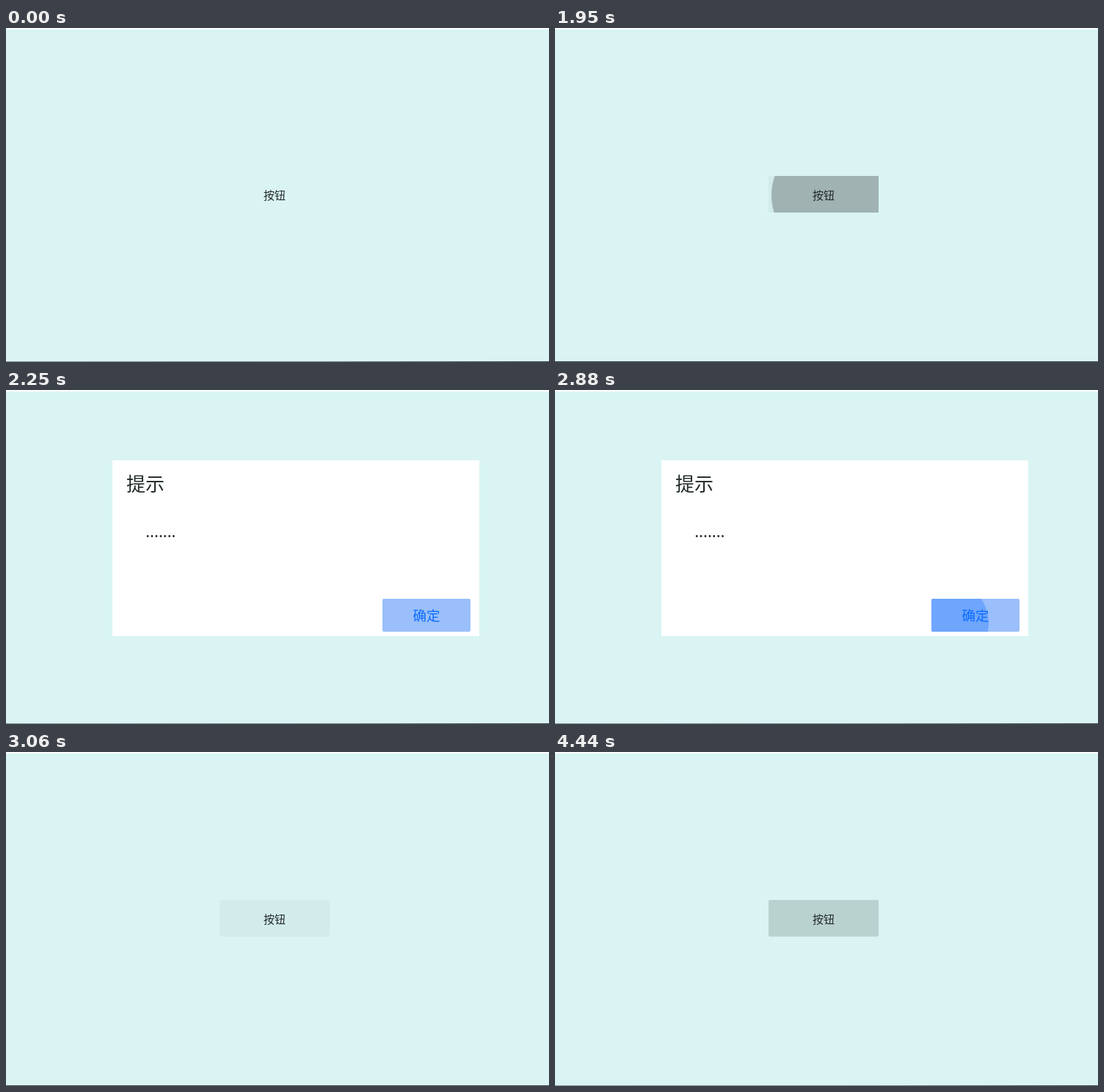
Animation of 740 by 456 pixels, one loop 4.47 s. Source, as an HTML page:

```html
<!DOCTYPE html>
<html lang="zh">
<head>
<meta charset="utf-8">
<style>
  html, body { margin: 0; width: 100%; height: 100%; overflow: hidden; background: #fff; }
  svg { display: block; width: 740px; height: 456px; }
  text { font-family: "Noto Sans CJK SC", "Noto Sans CJK", sans-serif; text-anchor: middle; fill: #222a2a; }
  #message { font-family: "Noto Sans", sans-serif; text-anchor: start; }
</style>
</head>
<body>
<svg viewBox="0 0 740 456">
  <defs>
    <linearGradient id="edgeFade">
      <stop offset="0" stop-color="#82908f"/>
      <stop offset=".6" stop-color="#738180"/>
      <stop offset="1" stop-color="#3c4645"/>
    </linearGradient>
    <clipPath id="buttonClip"><rect x="291" y="202" width="150" height="50"/></clipPath>
    <clipPath id="confirmClip"><rect x="513" y="285" width="120" height="45" rx="2"/></clipPath>
  </defs>
  <rect y="2" width="740" height="453" fill="#d9f4f3"/>
  <rect id="edge" y="455" width="740" height="1"/>

  <g id="page">
    <rect id="button" x="291" y="202" width="150" height="50" rx="2"/>
    <circle id="buttonRipple" cx="375" cy="228.5" fill="#a0b2b1" clip-path="url(#buttonClip)"/>
    <text x="366" y="233.5" font-size="15">按钮</text>
  </g>

  <g id="dialog">
    <rect x="145" y="96" width="500" height="240" fill="#fff"/>
    <text x="190" y="138" font-size="26">提示</text>
    <text id="message" x="190.2" y="201" font-size="22">.......</text>
    <rect id="confirm" x="513" y="285" width="120" height="45" rx="2"/>
    <circle id="confirmRipple" cx="532" cy="318" fill="#6fa5fd" clip-path="url(#confirmClip)"/>
    <text x="573" y="315" font-size="18.5" style="fill:#0a6cff">确定</text>
  </g>
</svg>
<script>
  const LOOP = 4470;
  const DARK = '#3b4746', FADE = 'url(#edgeFade)';
  const IDLE = 'none', SOFT = '#d1eceb', HOVER = '#bad2cf';
  const FOCUS = '#bbd4fb', ACTIVE = '#9abffa';

  // start ms, view, button fill, ripple radius, bottom edge
  const steps = [
    [0, 'page', IDLE, 0, FADE],
    [1890, 'page', SOFT, 55, DARK],
    [1950, 'page', SOFT, 80, DARK],
    [1980, 'dialog', FOCUS, 0, FADE],
    [2250, 'dialog', ACTIVE, 0, FADE],
    [2790, 'dialog', ACTIVE, 14, FADE],
    [2820, 'dialog', ACTIVE, 29, FADE],
    [2850, 'dialog', ACTIVE, 44, FADE],
    [2880, 'dialog', ACTIVE, 59, FADE],
    [2910, 'page', IDLE, 0, DARK],
    [3060, 'page', SOFT, 0, DARK],
    [3150, 'page', HOVER, 0, DARK],
    [4440, 'page', HOVER, 0, FADE]
  ];

  const get = id => document.getElementById(id);
  const set = (id, name, value) => get(id).setAttribute(name, value);

  function draw(time) {
    const [, view, fill, radius, edge] = steps.findLast(step => step[0] <= time);
    const control = view === 'page' ? 'button' : 'confirm';
    for (const id of ['page', 'dialog']) set(id, 'display', id === view ? 'inline' : 'none');
    set(control, 'fill', fill);
    set(control + 'Ripple', 'r', radius);
    set('edge', 'fill', edge);
    if (control === 'button') set('button', 'rx', radius ? 0 : 2);
  }

  const start = performance.now();
  function tick() {
    draw((performance.now() - start) % LOOP);
    requestAnimationFrame(tick);
  }
  tick();
</script>
</body>
</html>
```
